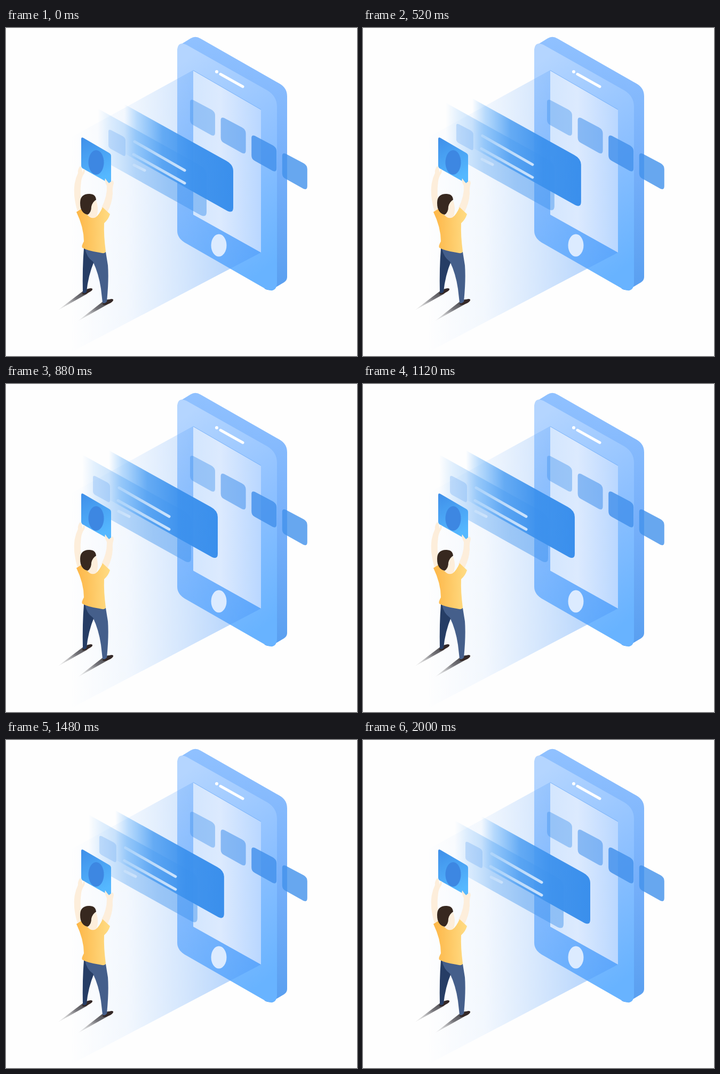
An HTML page that plays this animation: 658 px wide and 615 px high, repeating every 2160 ms.

```html
<!DOCTYPE html>
<html lang="en">
<head>
<meta charset="utf-8">
<title>Phone projection</title>
<style>
  html, body { margin: 0; width: 100%; height: 100%; overflow: hidden; background: #fefefe; }
  svg { display: block; }
</style>
</head>
<body>
<svg width="658" height="615" viewBox="0 0 658 615">
  <defs>
    <linearGradient id="face" x1=".3" y1="0" x2=".6" y2="1">
      <stop offset="0" stop-color="#b4d5ff"/>
      <stop offset=".5" stop-color="#8fc1ff"/>
      <stop offset="1" stop-color="#68b3ff"/>
    </linearGradient>
    <linearGradient id="side" x2="0" y2="1">
      <stop offset="0" stop-color="#90c1ff"/>
      <stop offset=".5" stop-color="#77b0fa"/>
      <stop offset="1" stop-color="#599ff0"/>
    </linearGradient>
    <linearGradient id="beam">
      <stop offset="0" stop-color="#5ca2fa" stop-opacity="0"/>
      <stop offset=".3" stop-color="#5ca2fa" stop-opacity=".07"/>
      <stop offset=".6" stop-color="#5ca2fa" stop-opacity=".26"/>
      <stop offset="1" stop-color="#4c98f8" stop-opacity=".5"/>
    </linearGradient>
    <linearGradient id="screen">
      <stop offset="0" stop-color="#d3e6fe"/>
      <stop offset=".4" stop-color="#dceafe"/>
      <stop offset="1" stop-color="#b9d7ff"/>
    </linearGradient>
    <linearGradient id="card">
      <stop offset="0" stop-color="#67b2fa" stop-opacity="0"/>
      <stop offset=".12" stop-color="#67b2fa" stop-opacity=".42"/>
      <stop offset=".35" stop-color="#4f9ff2" stop-opacity=".85"/>
      <stop offset=".65" stop-color="#3c91ed" stop-opacity=".96"/>
      <stop offset="1" stop-color="#3a8fec"/>
    </linearGradient>
    <linearGradient id="line" gradientUnits="userSpaceOnUse" x1="232" x2="335">
      <stop offset="0" stop-color="#fff" stop-opacity=".15"/>
      <stop offset=".5" stop-color="#fff" stop-opacity=".55"/>
      <stop offset="1" stop-color="#e3f0ff" stop-opacity=".85"/>
    </linearGradient>
    <linearGradient id="tile" x2=".3" y2="1">
      <stop offset="0" stop-color="#3f8fe9"/>
      <stop offset="1" stop-color="#55b8ff"/>
    </linearGradient>
    <linearGradient id="shirt">
      <stop offset="0" stop-color="#fdb647"/>
      <stop offset="1" stop-color="#ffdc84"/>
    </linearGradient>
    <linearGradient id="shade" x1="1" y1="0" x2="0" y2="1">
      <stop offset="0" stop-color="#2d2b30"/>
      <stop offset=".45" stop-color="#55545a" stop-opacity=".8"/>
      <stop offset="1" stop-color="#999" stop-opacity="0"/>
    </linearGradient>
    <path id="panel" d="M222 143L413 249Q426 256 426 268V337Q426 348 415 343L222 235Z"/>
  </defs>

  <!-- phone -->
  <path fill="url(#side)" d="M321 44Q321 35 329 30L346 19.500Q355 14 365 20L514 105Q527 113 527 128V467Q527 473 521 477L499 490Q492 493 485 489Z"/>
  <path fill="url(#face)" d="M321 44Q321 22 341 33L490 117Q508 128 508 148V476Q508 498 488 490L338 404Q321 395 321 380Z"/>
  <path fill="url(#beam)" d="M351 79L478 153V421L120 609V206Z"/>
  <path fill="url(#screen)" d="M351 79L478 153V421L351 350Z"/>
  <path stroke="#78b2fa" d="M351 79.500L478 153"/>
  <ellipse cx="399" cy="407.500" rx="14.500" ry="21" fill="#dcebff"/>
  <circle cx="395" cy="82" r="3" fill="#fff"/>
  <path stroke="#fff" stroke-width="5" stroke-linecap="round" d="M402 86.500L444 110"/>
  <g id="apps" fill="#4291ec"></g>

  <!-- sliding cards -->
  <g id="cards">
    <use href="#panel" x="-50" y="8" fill="url(#card)" opacity=".45"/>
    <path fill="#5a9df0" opacity=".28" d="M192 194Q192 189 197 191.500L219 203Q224 206 224 211V236Q224 242 219 239L197 227Q192 224 192 220Z"/>
    <use href="#panel" fill="url(#card)"/>
    <g fill="none" stroke="url(#line)" stroke-width="5" stroke-linecap="round">
      <path d="M241 213L335 267M239 237L335 291"/>
      <path d="M240 257L260 267"/>
    </g>
  </g>

  <!-- person -->
  <g fill="url(#shade)">
    <path d="M96 530L146 492Q154 487 161 489L151 499Z"/>
    <path d="M134 550L184 511Q193 507 200 510L189 519Z"/>
  </g>
  <path fill="#342827" d="M143 499Q143 493 151 492Q158 486 162 489Q163 492 155 496Q148 501 143 499ZM181 518Q182 512 189 512Q197 506 201 509Q202 513 193 517Q185 521 181 518Z"/>
  <path fill="#263d65" d="M146 413Q143 450 144 496Q147 499 151 495Q154 464 165 438L168 417Z"/>
  <path fill="#455f8b" d="M148 413Q151 430 163 438Q174 461 178 489L181 515Q185 518 189 513Q193 472 191 445L187 420Z"/>
  <path fill="url(#tile)" d="M141 208Q141 204 145 206L193 234Q197 236 197 240V289Q197 293 193 291L145 264Q141 262 141 258Z"/>
  <ellipse cx="169" cy="252" rx="14.500" ry="23" fill="#3d87e2"/>
  <g fill="#fdeedb">
    <path d="M139 259Q134 265 135 272Q126 290 128 314Q130 332 134 343L144 338Q137 314 141 287Q142 279 147 272Q149 266 146 264L143 271Q143 261 139 259Z"/>
    <path d="M186 282Q184 287 189 296Q190 316 179 337L189 347Q199 330 200 310Q199 300 202 291Q201 284 198 287L193 291Q190 288 186 282Z"/>
    <path d="M150 343L158 328L169 323Q174 338 171 349Q170 358 160 358L149 353Z"/>
  </g>
  <path fill="url(#shirt)" d="M132 345L143 338Q148 347 153 351Q160 359 168 355Q175 350 181 336L195 349Q192 359 184 366Q183 389 187 419Q186 424 175 421Q154 418 143 412Q141 409 146 400Q146 374 132 345Z"/>
  <path fill="#37281f" d="M139 328Q139 311 156 311Q168 311 169 322Q162 326 160 335Q160 346 153 350Q139 347 139 328Z"/>
</svg>
<script>
  const apps = document.getElementById("apps");
  const cards = document.getElementById("cards");

  apps.innerHTML = [0.42, 0.54, 0.82, 0.8].map((opacity, i) =>
    `<path opacity="${opacity}" transform="translate(${345 + 57.6 * i} ${134 + 33.5 * i})"
      d="M0 5Q0-1 6 1L40 19Q47 23 47 30V62Q47 70 40 67L6 48Q0 45 0 38Z"/>`).join("");

  const LOOP = 2160, SWING = 1000, STEP = 40;

  // The cards glide out and back at constant speed, then rest until the loop ends.
  function draw() {
    const time = Math.floor(performance.now() % LOOP / STEP) * STEP;
    const k = Math.max(0, 1 - Math.abs(1 - time / SWING));
    cards.setAttribute("transform", `translate(${-33 * k} ${-21 * k})`);
    requestAnimationFrame(draw);
  }
  draw();
</script>
</body>
</html>
```
